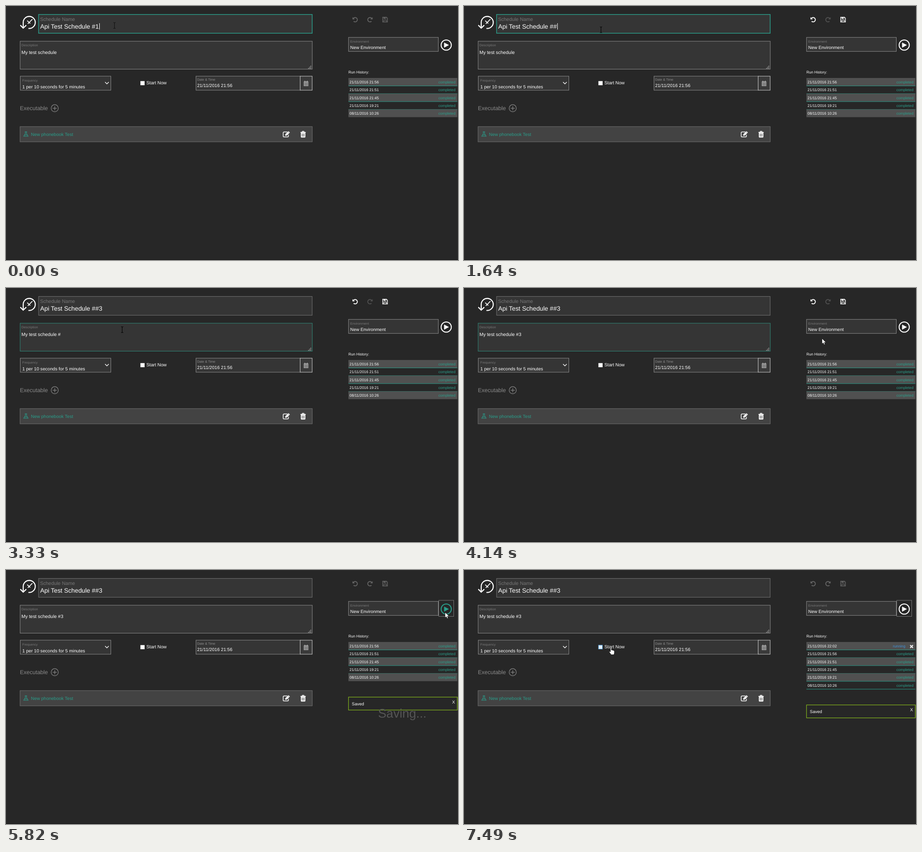
An HTML page that plays this animation: 998 px wide and 561 px high, repeating every 8 s.

```html
<!DOCTYPE html>
<html lang="en">
<head>
<meta charset="utf-8">
<title>Schedule editor</title>
<style>
  html, body { margin: 0; width: 100%; height: 100%; overflow: hidden; background: #272727; }
  svg { display: block; width: 100vw; height: 100vh; }
  text { font-family: "Liberation Sans", Arial, sans-serif; text-rendering: geometricPrecision; white-space: pre; }
</style>
</head>
<body>
<svg id="stage" viewBox="0 0 998 561" xmlns="http://www.w3.org/2000/svg"></svg>
<script>
const LOOP = 8000;
const TEAL = '#2a9d8a', WHITE = '#fff', LABEL = '#777', EDGE = '#8c8c8c', FIELD = '#353535';

// Each step overrides part of the state before it.
const steps = [
  { at: 0, name: 'Api Test Schedule #1', desc: 'My test schedule', focus: 'name',
    caret: [206.5, 38, 52], pointer: ['beam', 239.5, 43, '#111'] },
  { at: 830, name: 'Api Test Schedule ##', pointer: null },
  { at: 1640, edited: true, pointer: ['beam', 302.5, 52.5, '#000'] },
  { at: 2480, name: 'Api Test Schedule ##3', focus: 'desc',
    caret: [112.5, 97, 108], pointer: ['beam', 255, 100, '#000'] },
  { at: 3330, desc: 'My test schedule #', caret: null, pointer: ['beam', 256.5, 92, '#000'] },
  { at: 4140, desc: 'My test schedule #3', pointer: ['arrow', 790.5, 111.5] },
  { at: 4980, hover: true, pointer: ['arrow', 969.5, 93.5] },
  { at: 5820, edited: false, focus: 'play', saved: 0, saving: true },
  { at: 6660, hover: false, saving: false, loading: true, shift: 19.3, saved: 19.3,
    pointer: ['arrow', 347, 188.5] },
  { at: 7490, loading: false, shift: 0, saved: 17.3, running: true, check: true,
    pointer: ['hand', 321, 171] }
];
let state = {};
const states = steps.map(s => (state = { ...state, ...s }));

const text = (x, y, size, str, fill = WHITE, extra = '') =>
  `<text x="${x}" y="${y}" font-size="${size}" fill="${fill}" ${extra}>${str}</text>`;
const rect = (x, y, w, h, fill, stroke = 'none', sw = 1) =>
  `<rect x="${x}" y="${y}" width="${w}" height="${h}" fill="${fill}" stroke="${stroke}" stroke-width="${sw}"/>`;
const fillPath = (d, fill = WHITE, extra = '') => `<path d="${d}" fill="${fill}" ${extra}/>`;
const line = (d, stroke = WHITE, sw = 1, extra = '') =>
  `<path d="${d}" fill="none" stroke="${stroke}" stroke-width="${sw}" ${extra}/>`;
const ring = (x, y, r, stroke, sw) =>
  `<circle cx="${x}" cy="${y}" r="${r}" fill="none" stroke="${stroke}" stroke-width="${sw}"/>`;
const group = (x, y, body, more = '') => `<g transform="translate(${x} ${y}) ${more}">${body}</g>`;

const clockIcon =
  line('M38 48V36A13.3 13.3 0 1 1 51.3 49.6H49.5', WHITE, 2.3) +
  line('M31.6 42.4L38 48.8L44.8 42.4', WHITE, 2.3) +
  line('M58.3 29.2L48.2 39.4M46.8 32.4L53.6 38.6', WHITE, 1.7);

const undo = fill =>
  line('M-4 -2.6A4.8 4.8 0 1 1 -3.4 3.5', fill, 1.9) + fillPath('M-6 -5.8V-.8H-1Z', fill);

const saveIcon = fill =>
  line('M-5.3 -5.3H3L5.3 -3V5.3H-5.3Z', fill, 1.4) +
  line('M-2.8 5V1.2H2.9V5', fill, 1.2) +
  fillPath('M-3.2 -5.3H2.4V-1.5H-3.2ZM0 -4.6V-2.3H1.3V-4.6Z', fill, 'fill-rule="evenodd"');

const calendarIcon =
  fillPath('M-5 -4.5H5V6H-5ZM-3.4 -6H-1.8V-4H-3.4ZM1.8 -6H3.4V-4H1.8Z', '#a5a5a5') +
  line('M-4.2 -1.8H4.2M-4.2 .8H4.2M-4.2 3.3H4.2M-2 -1.8V5.4M.4 -1.8V5.4M2.7 -1.8V5.4', '#555', .6);

const flaskIcon = line(
  'M-2.4 -5.2H2.4M-1.3 -5V-1L-5 4.8H5L1.3 -1V-5M-2.9 1.8H2.9', TEAL, 1.1, 'stroke-linejoin="round"');

const editIcon =
  line('M2.5 -5H-5Q-7 -5 -7 -3V4Q-7 6 -5 6H2.6Q4.6 6 4.6 4V1.4', WHITE, 1.5) +
  fillPath('M-2.6 3.3V.2L4.6 -6.7L7.9 -3.6L.6 3.3Z') +
  line('M-1.4 .8L.5 2.5M3.2 -5.3L6.3 -2.2', '#434343', .7);

const trashIcon =
  line('M-6 -4.5H6M-2.2 -4.8L-1.6 -6.7H1.6L2.2 -4.8', WHITE, 1.5) +
  fillPath('M-5 -4H5V5.5Q5 7 3.5 7H-3.5Q-5 7 -5 5.5Z') +
  line('M-2.4 -1.8V4.8M0 -1.8V4.8M2.4 -1.8V4.8', '#434343', 1);

const branchIcon =
  ring(759.3, 107.2, 2, '#ccc', 1.3) + ring(768.6, 116.8, 2, '#ccc', 1.3) +
  line('M759.3 109.3V118.5L768.6 106V114.8', '#ccc', 1.3);

const pointers = {
  beam: ink => line('M-2.5 -6.5Q0 -6.5 0 -5Q0 -6.5 2.5 -6.5M0 -5.5V5.5M-2.5 6.5Q0 6.5 0 5Q0 6.5 2.5 6.5', ink, 1.1),
  arrow: () => fillPath('M0 0V12L2.8 9.4L4.7 13.7L6.7 12.8L4.9 8.7H8.6Z', WHITE, 'stroke="#111" stroke-width=".7"'),
  hand: () => fillPath(
    'M2.3 1.2Q3.3 -.6 4.5 1.2V5.8Q6 5 6.6 6.2Q8.2 5.5 8.8 6.9Q10.7 6.4 11 8.4V11.5Q11 13.5 9.8 16H3.8Q2.5 13.5 .2 11Q-1 8.8 .8 8.7L2.3 9.9Z',
    WHITE, 'stroke="#111" stroke-width=".7"')
};

const grip = [[5, 0], [2.5, 2.5], [5, 2.5], [0, 5], [2.5, 5], [5, 5]]
  .map(([x, y]) => rect(667.3 + x, 132 + y, 1.3, 1.3, '#ddd')).join('');

const fixed =
  rect(0, 0, 998, 561, '#272727') + rect(0, 560, 998, 1, '#151515') + clockIcon +
  rect(31.5, 155, 200, 31, FIELD, EDGE) +
  text(36, 167, 7.2, 'Frequency', LABEL) +
  text(36, 181.5, 10.1, '1 per 10 seconds for 5 minutes') +
  line('M218.7 168L222.8 172L226.9 168', WHITE, 1.3) +
  text(310, 173.3, 10.2, 'Start Now') +
  rect(419.5, 155, 230, 31, FIELD, EDGE) +
  text(422, 165.3, 7.3, 'Date &amp; Time', '#8e8e8e') +
  text(422, 179.3, 10.1, '21/11/2016 21:56') +
  rect(649.5, 155, 26.5, 31, '#3a3a3a', '#d0d0d0') + group(662.5, 171, calendarIcon) +
  text(30.7, 229.8, 12.5, 'Executable', '#8a8a8a') +
  ring(107.6, 225.8, 7.9, '#8a8a8a', 1.2) + line('M103.2 225.8H112M107.6 221.4V230.2', '#8a8a8a', 1.2) +
  rect(31, 266.3, 645.2, 33.7, '#434343', '#707070') +
  group(44, 283, flaskIcon) + text(55, 286.6, 10, 'New phonebook Test', TEAL) +
  group(619, 283.2, editIcon) + group(656, 283.5, trashIcon) +
  rect(756.3, 69.3, 198.2, 31, FIELD, EDGE) +
  text(760, 81.2, 7.35, 'Environment', LABEL) +
  text(760, 95.2, 9.95, 'New Environment');

const nameField = s =>
  rect(72, 18.7, 604, 41.5, FIELD, s.focus === 'name' ? TEAL : '#777', s.focus === 'name' ? 1.5 : 1) +
  text(75.2, 32.5, 10.85, 'Schedule Name', LABEL) +
  text(75.6, 50, 13.8, s.name);

const descField = s =>
  rect(31.2, 77.8, 645, 61.7, FIELD, s.focus === 'desc' ? '#2f8a7b' : EDGE) +
  text(34, 89.3, 7.3, 'Description', LABEL) +
  text(34, 106, 10.4, s.desc) + grip;

function toolbar(s) {
  const on = s.edited ? WHITE : '#646464';
  return group(771, 30.2, undo(on)) +
    group(803.5, 30.2, undo(s.edited ? '#505050' : '#646464'), 'scale(-1 1)') +
    group(837, 30, saveIcon(on));
}

function playButton(s) {
  const c = s.hover ? TEAL : WHITE;
  return (s.focus === 'play' ? rect(955.5, 67, 33, 35.5, 'none', '#777') : '') +
    ring(972, 86.2, 11.3, c, 2) + fillPath('M967.3 80.7L978 86.3L967.3 91.9Z', c);
}

function history(s) {
  const dates = ['21/11/2016 21:56', '21/11/2016 21:51', '21/11/2016 21:45', '21/11/2016 19:21', '08/11/2016 10:26'];
  if (s.running) dates.unshift('21/11/2016 22:02');
  const rows = dates.map((date, i) => {
    const y = 159 + i * 17.35, live = s.running && i === 0;
    const back = i % 2
      ? rect(756, y - .4, 240.5, 1, TEAL) + rect(756, y + 16.9, 240.5, 1, TEAL)
      : rect(756, y, 240.5, 17.1, '#505050');
    const status = live
      ? text(947, y + 12, 8.25, 'running', '#4090d8') + line('M985.2 166L991.2 172M991.2 166L985.2 172', WHITE, 2.2)
      : text(954.7, y + 12, 8.2, 'completed', TEAL);
    return back + text(758.6, y + 12, 8.4, date) + status;
  });
  return group(0, s.shift || 0, text(756, 148.6, 8.3, 'Run History:') + rows.join(''));
}

const notice = s => s.saved === undefined ? '' : group(0, s.saved,
  rect(756.3, 280.7, 240.2, 28.6, '#272727', '#86b81c', 1.2) +
  text(763.6, 298.9, 9.5, 'Saved') + text(985, 295.2, 9.6, 'X'));

function draw(s) {
  const parts = [fixed, nameField(s), descField(s), toolbar(s), playButton(s), history(s), notice(s)];
  parts.push(s.check
    ? rect(297, 166, 8.6, 8.6, '#e4f1fd', '#5aa5e6', 1)
    : rect(296.8, 165.8, 9.2, 9.2, WHITE));
  if (s.saving) parts.push(text(821.5, 326, 27.5, 'Saving...', '#555'));
  if (s.loading) parts.push(branchIcon, text(779.6, 119, 10.15, 'Loading run history...', '#a0a0a0', 'font-weight="bold"'));
  if (s.caret) {
    const [x, top, bottom] = s.caret;
    parts.push(line(`M${x} ${top}V${bottom}`));
  }
  if (s.pointer) {
    const [kind, x, y, ink] = s.pointer;
    parts.push(group(x, y, pointers[kind](ink)));
  }
  return parts.join('');
}

const stage = document.getElementById('stage');
const start = performance.now();
let shown;
function tick() {
  const t = (performance.now() - start) % LOOP;
  const now = states.findLast(s => s.at <= t);
  if (now !== shown) stage.innerHTML = draw(shown = now);
  requestAnimationFrame(tick);
}
tick();
</script>
</body>
</html>
```
